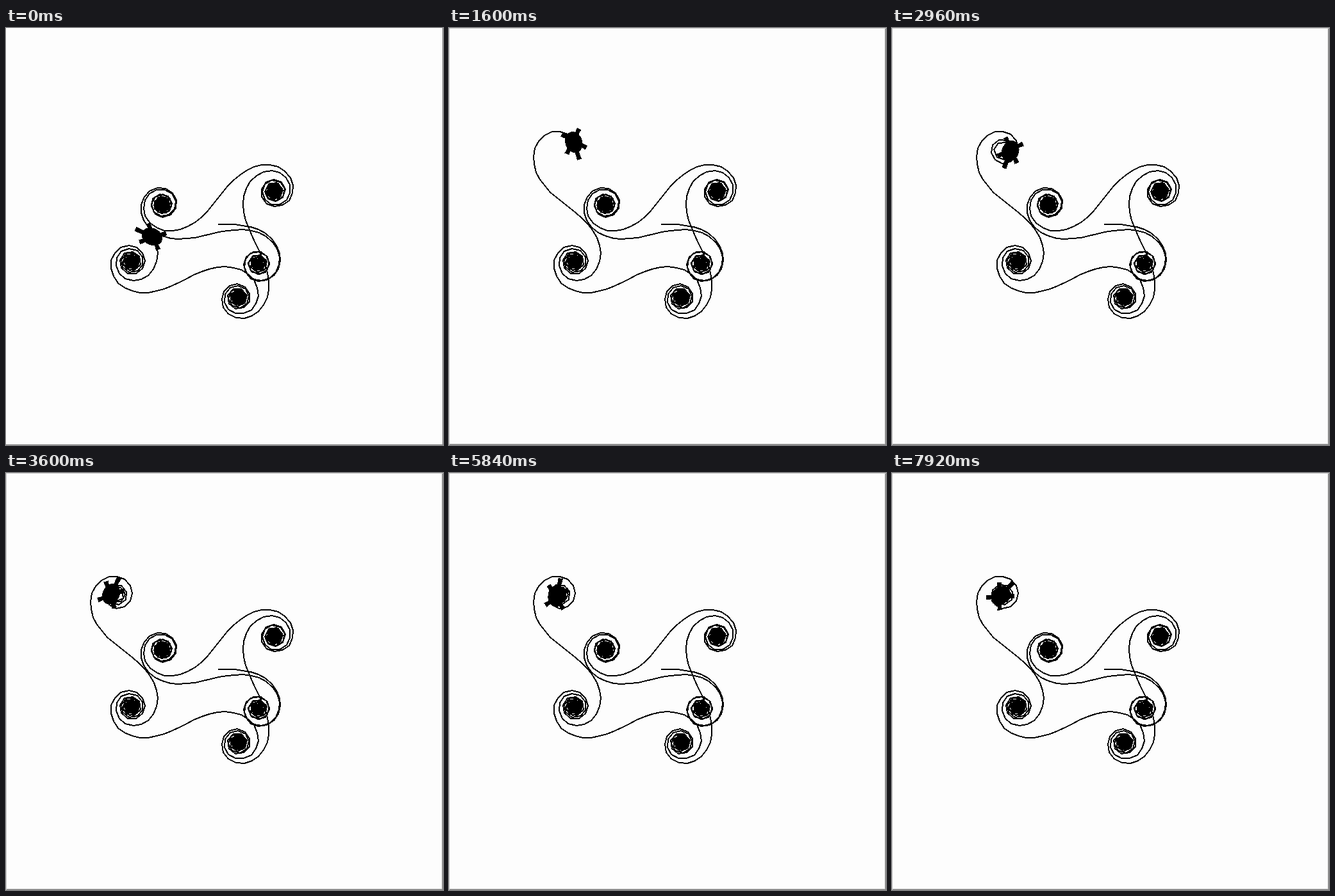
An HTML page that plays this animation: 682x652 px, repeating every 8000 ms.

```html
<!DOCTYPE html>
<html lang="en">
<head>
<meta charset="utf-8">
<title>Turtle spiral</title>
<style>
  html, body { margin: 0; width: 100%; height: 100%; overflow: hidden; background: #fdfdfd; }
  svg { display: block; width: 682px; height: 652px; }
</style>
</head>
<body>
<svg viewBox="0 0 682 652" shape-rendering="crispEdges">
  <rect width="682" height="652" fill="#fdfdfd"/>
  <path d="M681.5 0V651.5H0" fill="none" stroke="#808080"/>
  <g id="frame" fill="none">
    <path d="M.5 652V.5H682" stroke="#c8c8c8"/>
    <path d="M680.5 1V650.5H1" stroke="#b4b4b4"/>
  </g>
  <path id="trail" fill="none" stroke="#000" stroke-width="2" stroke-linejoin="round"/>
  <g id="turtle" stroke="#000" stroke-width=".5">
    <ellipse cx="1.5" rx="8.2" ry="6.4"/>
    <path id="limbs"/>
  </g>
</svg>
<script>
const $ = id => document.getElementById(id);
const LOOP = 8000, TICK = 80;      // the turtle takes one step per tick
const SIDE = 12.76;                // length of one step
const INC = 180 / 95.03578;        // degrees by which each turn exceeds the last
const FIRST = 945;                 // steps already taken when the loop begins
const LAST = FIRST + LOOP / TICK;
const TURNED = 0.9;                // share of the current turn already made

const rad = deg => deg * Math.PI / 180;
const heading = n => INC * n * (n + 1) / 2;

const points = [{ x: 331, y: 307 }];
for (let n = 0; n < LAST; n++) {
  const { x, y } = points[n], a = rad(heading(n));
  points.push({ x: x + SIDE * Math.cos(a), y: y + SIDE * Math.sin(a) });
}
const nodes = points.map(p => Math.round(p.x) + ' ' + Math.round(p.y));

// A limb widens from the body to its tip; the turtle looks along +x.
function limb(angle, reach) {
  const c = Math.cos(rad(angle)), s = Math.sin(rad(angle));
  const at = (r, w) => `${r * c - w * s} ${r * s + w * c}`;
  return `M${at(4, 1)}L${at(reach, 1.6)}L${at(reach, -1.6)}L${at(4, -1)}Z`;
}
const pair = (angle, reach) => limb(angle, reach) + limb(-angle, reach);
$('limbs').setAttribute('d', limb(0, 15.5) + pair(43, 11.5) + pair(135, 10));

function draw(t) {
  const n = FIRST + t / TICK;
  const { x, y } = points[n];
  const dir = heading(n - 1) + TURNED * (INC * n % 360);
  $('trail').setAttribute('d', 'M' + nodes.slice(0, n + 1).join('L'));
  $('turtle').setAttribute('transform',
    `translate(${x.toFixed(2)} ${y.toFixed(2)}) rotate(${(dir % 360).toFixed(2)}) scale(2)`);
  $('frame').style.display = t < 240 ? 'none' : '';
}

let shown = -1;
const begin = performance.now();
function loop() {
  const now = Math.max(0, performance.now() - begin) % LOOP;
  const t = Math.floor(now / TICK) * TICK;
  if (t !== shown) draw(shown = t);
  requestAnimationFrame(loop);
}
loop();
</script>
</body>
</html>
```
